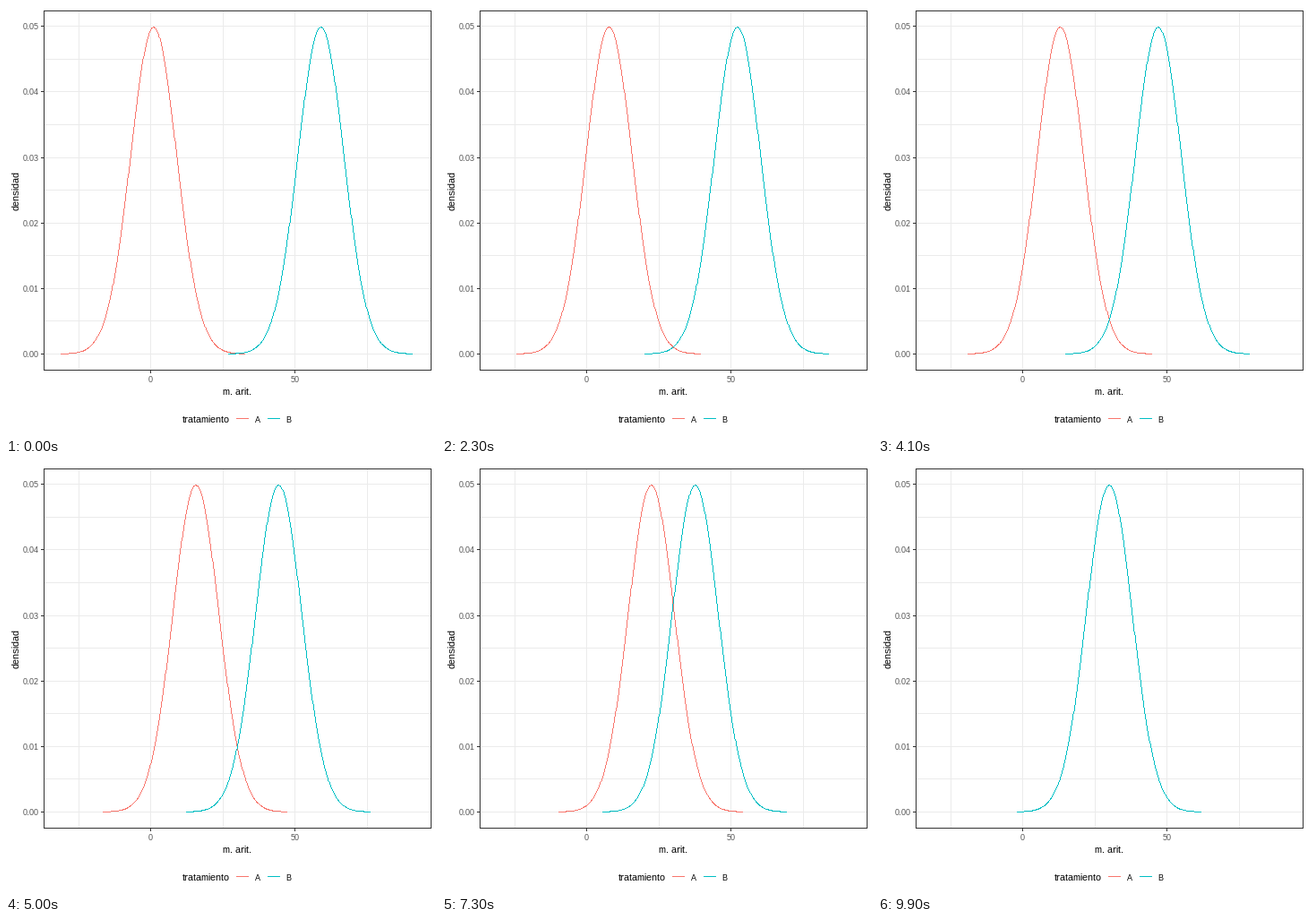
A matplotlib script for the animation above (10000 ms loop, 480 by 480 pixels).

```python
import matplotlib.pyplot as plt
import numpy as np
from matplotlib.animation import FuncAnimation

SIZE, DPI = 480, 72
FRAMES, INTERVAL = 100, 100
SD = 8
RED, TEAL = "#F8766D", "#00BFC4"
GRID, DARK, LABEL = "#EBEBEB", "#333333", "#4D4D4D"
LEFT, RIGHT, TOP, BOTTOM = 42, 474, 5, 406

plt.rcParams.update({
    "font.family": "Liberation Sans",
    "text.hinting": "native",
    "text.hinting_factor": 1,
    "path.simplify": False,
})


def col(v):
    """Pixel column of a data x."""
    return np.floor(161.6 + 3.219 * np.asarray(v))


def row(v):
    """Pixel row of a data y."""
    return np.floor(388.4 - 7312 * np.asarray(v))


fig = plt.figure(figsize=(SIZE / DPI, SIZE / DPI), dpi=DPI, facecolor="white")
ax = fig.add_axes([0, 0, 1, 1])
ax.set(xlim=(0, SIZE), ylim=(SIZE, 0))
ax.axis("off")


def line(xs, ys, color, z):
    return ax.plot(xs, ys, color=color, lw=1, zorder=z, snap=False,
                   solid_capstyle="butt")[0]


def hline(y, x0, x1, color, z):
    line([x0, x1], [y + 0.5, y + 0.5], color, z)


def vline(x, y0, y1, color, z):
    line([x + 0.5, x + 0.5], [y0, y1], color, z)


def label(x, y, s, size, color="black", **kw):
    ax.text(x, y, s, fontsize=size, color=color, va="baseline", **kw)


def trace(x, y):
    """One-pixel dashes along a polyline of whole pixels, without smoothing."""
    dx, dy = np.diff(x), np.diff(y)
    n = np.maximum(abs(dx), abs(dy)).astype(int)
    seg = np.repeat(np.arange(len(n)), n)
    t = (np.arange(n.sum()) - (np.cumsum(n) - n)[seg]) / n[seg]
    px = np.floor(x[seg] + dx[seg] * t + 0.5)
    py = np.floor(y[seg] + dy[seg] * t + 0.5) + 0.5
    gap = np.full_like(px, np.nan)
    return (np.column_stack([px, px + 1, gap]).ravel(),
            np.column_stack([py, py, gap]).ravel())


# Grid, ticks and tick labels
for v in (-25, 0, 25, 50, 75):
    x = col(v)
    vline(x, TOP, BOTTOM, GRID, 1)
    if v in (0, 50):
        vline(x, BOTTOM + 1, BOTTOM + 4, DARK, 3)
        label(x + 0.5, 420, str(v), 9, LABEL, ha="center")

for i in range(11):
    y = row(i * 0.005)
    hline(y, LEFT, RIGHT, GRID, 1)
    if i % 2 == 0:
        hline(y, LEFT - 3, LEFT, DARK, 3)
        label(19, y + 4, f"{i * 0.005:.2f}", 9, LABEL)

# Panel border
for y in (TOP, BOTTOM):
    hline(y, LEFT, RIGHT + 1, DARK, 6)
for x in (LEFT, RIGHT):
    vline(x, TOP, BOTTOM + 1, DARK, 6)

# Axis titles and legend
label(258, 434, "m. arit.", 11, ha="center")
label(15, 206, "densidad", 11, ha="center", rotation=90,
      rotation_mode="anchor")
label(197, 465, "tratamiento", 11)
for key_x, text_x, name, color in ((257, 278, "A", RED),
                                   (292, 312, "B", TEAL)):
    hline(460, key_x, key_x + 14, color, 3)
    label(text_x, 465, name, 9)

# Density curves
z = np.linspace(-4, 4, 401)
density = row(np.exp(-z**2 / 2) / (SD * np.sqrt(2 * np.pi)))
curve_a = line([], [], RED, 4)
curve_b = line([], [], TEAL, 5)


def update(i):
    shift = 29 * i / (FRAMES - 1)
    curve_a.set_data(*trace(col(1 + shift + z * SD), density))
    curve_b.set_data(*trace(col(59 - shift + z * SD), density))
    return curve_a, curve_b


anim = FuncAnimation(fig, update, frames=FRAMES, interval=INTERVAL,
                     repeat=True, repeat_delay=0)
plt.show()
```
